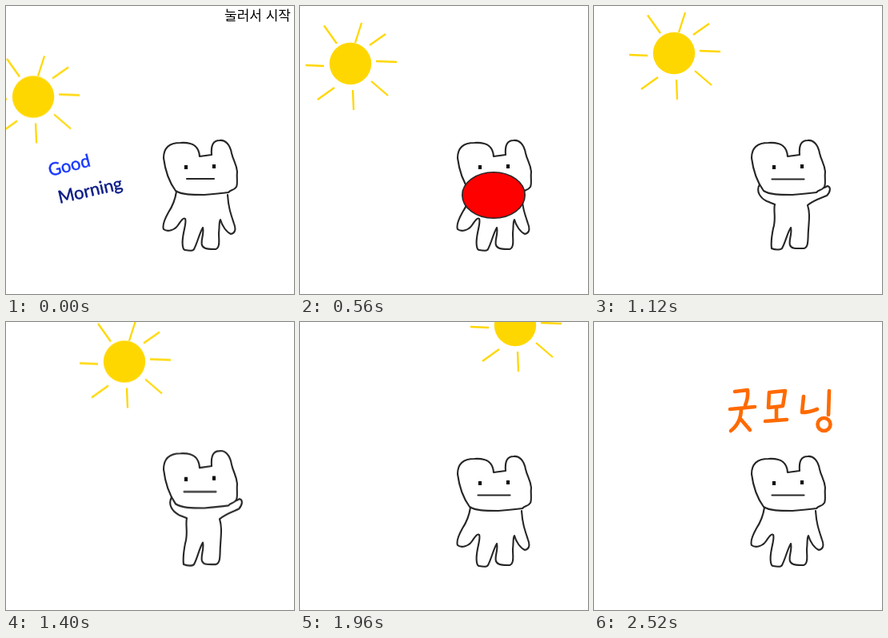
Write an HTML page that moves like this. It is 360 by 360 pixels and loops after 3370 ms.

```html
<!DOCTYPE html>
<html lang="ko">
<head>
<meta charset="utf-8">
<title>Good Morning</title>
<style>
html, body { margin: 0; width: 100%; height: 100%; overflow: hidden; background: #fff; }
svg { display: block; width: 100%; height: 100%; }
.line { fill: none; stroke: #262626; stroke-width: 2.1; stroke-linecap: round; stroke-linejoin: round; }
.mouth { fill: #f00; stroke: #262626; stroke-width: 1.6; }
.hint { font: 17px "Noto Sans CJK KR", "Noto Sans CJK", sans-serif; }
.greet { font: 22px Lato, sans-serif; stroke-width: 0.45; }
.good { fill: #1838ff; stroke: #1838ff; }
.morning { fill: #0c1c86; stroke: #0c1c86; }
.hangul { fill: none; stroke: #ff6a00; stroke-width: 4.6; stroke-linecap: round; stroke-linejoin: round; }
.rays { stroke: #ffd700; stroke-width: 2.3; }

.a { animation: 3370ms step-end infinite; }
#sun { animation-name: sun; }
#bear { animation-name: stretch; transform-origin: 0 304px; }
#hint, #short { animation-name: hint; }
#greet { animation-name: greet; }
#hangul { animation-name: hangul; }
#down { animation-name: down; }
#up { animation-name: up; }
#flat { animation-name: flat; }
#open { animation-name: open; }
#wide { animation-name: wide; }

@keyframes sun {
  0% { transform: translate(34px, 113.5px); opacity: 1; }
  8.308% { transform: translate(63px, 85.5px); opacity: 1; }
  16.617% { transform: translate(63px, 72px); opacity: 1; }
  24.925% { transform: translate(63px, 72px); opacity: 0; }
  33.234% { transform: translate(100px, 59px); opacity: 1; }
  41.543% { transform: translate(148px, 49.5px); opacity: 1; }
  49.851% { transform: translate(201px, 19.5px); opacity: 1; }
  58.16% { transform: translate(269px, 4px); opacity: 1; }
  66.468% { transform: translate(295px, -9px); opacity: 1; }
  74.777%, 100% { transform: translate(295px, -9px); opacity: 0; }
}
@keyframes stretch {
  0%, 58.16%, 100% { transform: none; }
  41.543% { transform: scaleY(1.05); }
  49.851% { transform: translateY(-1px) scaleY(1.21); }
}
@keyframes hint {
  0% { opacity: 1; }
  8.308%, 100% { opacity: 0; }
}
@keyframes greet {
  0%, 49.851% { opacity: 1; }
  8.308%, 58.16%, 100% { opacity: 0; }
}
@keyframes hangul {
  0% { opacity: 0; }
  66.468%, 100% { opacity: 1; }
}
@keyframes down {
  0%, 58.16%, 100% { opacity: 1; }
  33.234% { opacity: 0; }
}
@keyframes up {
  0%, 58.16%, 100% { opacity: 0; }
  33.234% { opacity: 1; }
}
@keyframes flat {
  0% { opacity: 0; }
  24.925%, 100% { opacity: 1; }
}
@keyframes open {
  0%, 16.617%, 100% { opacity: 0; }
  8.308% { opacity: 1; }
}
@keyframes wide {
  0%, 24.925%, 100% { opacity: 0; }
  16.617% { opacity: 1; }
}
</style>
</head>
<body>
<svg viewBox="0 0 360 360">
  <g id="sun" class="a">
    <circle r="26.2" fill="#ffd700"/>
    <path class="rays" d="M-33-47.500L-17-25M14-51L6-26M44-37L24-23M32-3L58-2M26 22L47 40M3 33L4 58M-20 30L-41 45M-56 2L-33 3"/>
  </g>

  <text id="hint" class="a hint" x="273" y="18">눌러서 시작</text>

  <g id="greet" class="a greet">
    <text class="good" transform="translate(55 213) rotate(-14)">Good</text>
    <text class="morning" transform="translate(67 247) rotate(-13)">Morning</text>
  </g>

  <g id="bear" class="a">
    <path id="down" class="a line" d="M213 232C211 245 207 252 203 258C198 267 195 274 197 279C202 283 211 280 215 274C219 268 222 264 224 266C226 270 222 280 221 290C220 298 221 305 224 305C229 306 234 306 235 304C240 294 241 286 246 277C248 285 243 293 245 299C247 304 254 304 262 304C268 302 266 292 266 284C267 276 266 270 268 267C270 275 276 283 281 285C286 284 288 280 285 272C281 260 278 252 277 236"/>
    <path id="up" class="a line" d="M207 223C202 232 208 240 216 244C221 246 224 247 226 248C224 256 228 266 224 278C222 288 221 296 222 303C226 305 233 305 235 303C240 294 241 285 246 277C248 285 243 293 245 299C247 304 254 303 262 303C269 302 267 290 268 280C269 266 270 258 267 249C274 243 284 240 291 237C296 232 296 226 292 225L288 227"/>
    <path class="line" d="M212 231C204 220 199 206 197 190C197 177 204 171 218 171C232 170 241 174 242 188L257 186C256 174 259 168 267 168C274 167 280 173 282 184C284 193 288 197 289 207C288 214 290 222 288 226C285 231 281 229 278 233C270 234 260 235 248 236C232 236 220 236 212 231"/>
    <path d="M223 199h4v5h-4zM258 198h4v5h-4z"/>
    <path id="short" class="a line" d="M226 216H260"/>
    <path id="flat" class="a line" d="M222.500 216.500H262.500"/>
    <ellipse id="open" class="a mouth" cx="242" cy="220" rx="17" ry="11"/>
    <ellipse id="wide" class="a mouth" cx="242" cy="236.500" rx="39.200" ry="28.700"/>
  </g>

  <g id="hangul" class="a hangul">
    <path d="M176 87L192 85Q193 95 189 104M170 109L201 106M184 108Q184 126 171 136M183 121L195 135"/>
    <path d="M219 88L218 107M219 88L239 86L236 105L218 107M228 107L228 122M214 124L241 122"/>
    <path d="M262 93L260 113Q269 113 279 109M294 86L293 116"/>
    <ellipse cx="287.500" cy="128" rx="8" ry="8"/>
  </g>
</svg>
</body>
</html>
```
